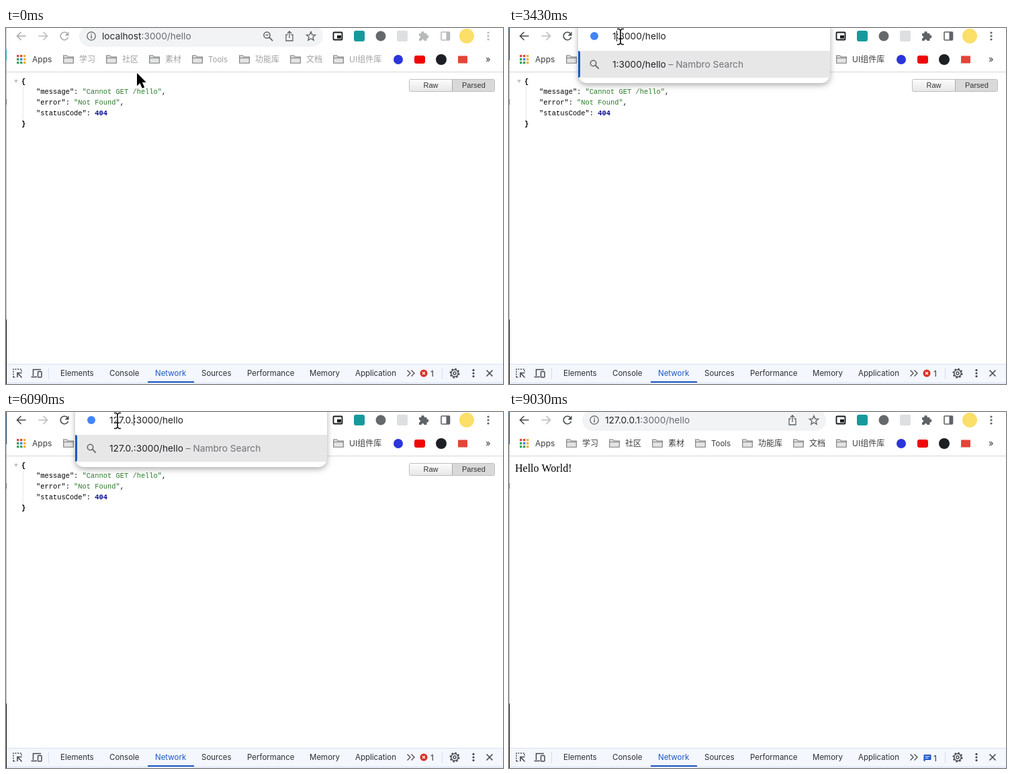
Write an HTML page with a canvas that moves like this. It is 740 px wide and 530 px high and loops after 9310 ms.

```html
<!DOCTYPE html>
<html lang="en">
<head>
<meta charset="utf-8">
<title>Local request</title>
<style>
html, body { margin: 0; width: 100%; height: 100%; overflow: hidden; background: #fff; }
canvas { display: block; width: 740px; height: 530px; }
</style>
</head>
<body>
<canvas id="stage"></canvas>
<script>
const W = 740, H = 530, LOOP = 9310, STEP = 70;
const canvas = document.getElementById('stage');
const dpr = window.devicePixelRatio || 1;
canvas.width = W * dpr;
canvas.height = H * dpr;
const c = canvas.getContext('2d');

const UI = 'Inter, "Noto Sans CJK SC", "Noto Sans CJK", sans-serif';
const MONO = '"Liberation Mono", monospace';
const INK = '#3c4043', LINK = '#1a57c4';
const TAU = Math.PI * 2;

const ACTIVE = 490, SELECT = 700, BLUR = 1680, PICK = 2590, ENTER = 7700, LOADED = 7840, REPORT = 8120;
const typed = [
  [3430, '1'], [3570, '12'], [4270, '127'], [5250, '127.'], [5880, '127.0'],
  [6020, '127.0.'], [6160, '127.0.0'], [6300, '127.0.0.'], [6860, '127.0.0.1']
];
const caretResets = [3430, 3640, 4270, 5250, 5530, 5880, 6020, 6160, 6300, 6580, 6860, 7070];
const path = [
  [0, 195, 67], [560, 190, 13], [700, 190, 13], [1260, 83, 10], [1680, 83, 10],
  [2380, 166, 13], [8400, 166, 13], [8960, 172, 545]
];
const clicks = [[630, 770], [1540, 1680], [2450, 2730]];

function text(s, x, y, size, color, font = UI, weight = 400) {
  c.font = `${weight} ${size}px ${font}`;
  c.fillStyle = color;
  c.fillText(s, x, y);
  return x + c.measureText(s).width;
}
function rect(x, y, w, h, color) {
  c.fillStyle = color;
  c.fillRect(x, y, w, h);
}
function round(x, y, w, h, r, fill, stroke, lw = 1) {
  c.beginPath();
  c.roundRect(x, y, w, h, r);
  paint(fill, stroke, lw);
}
function disc(x, y, r, fill, stroke, lw = 1) {
  c.beginPath();
  c.arc(x, y, r, 0, TAU);
  paint(fill, stroke, lw);
}
function paint(fill, stroke, lw) {
  if (fill) { c.fillStyle = fill; c.fill(); }
  if (stroke) { c.strokeStyle = stroke; c.lineWidth = lw; c.stroke(); }
}
// Each polyline is a flat list of x, y pairs.
function lines(color, lw, ...polys) {
  c.beginPath();
  for (const p of polys)
    for (let i = 0; i < p.length; i += 2) c[i ? 'lineTo' : 'moveTo'](p[i], p[i + 1]);
  paint(null, color, lw);
}
function dots(x, y, gap, color) {
  for (const k of [-1, 0, 1]) disc(x, y + k * gap, 1.6, color);
}
function lens(x, y, r, color) {
  disc(x - 1.5, y - 1.5, r, null, color, 1.5);
  lines(color, 1.8, [x + r * .7 - 1.5, y + r * .7 - 1.5, x + r + 2.5, y + r + 2.5]);
}
function latest(list, t) {
  return list.filter(e => (e[0] ?? e) <= t).pop();
}

function navButtons(on) {
  const ink = on ? '#46494d' : '#a9abad';
  const arrow = (x, d, color) =>
    lines(color, 1.6, [x - 6.5 * d, 12, x + 6.5 * d, 12], [x + .5 * d, 6, x + 6.5 * d, 12, x + .5 * d, 18]);
  arrow(23, -1, ink);
  arrow(55, 1, '#b9bbbe');
  c.beginPath();
  c.arc(87, 12, 5.8, .3, TAU - .8);
  paint(null, ink, 1.6);
  c.beginPath();
  c.moveTo(93.5, 5.5); c.lineTo(93.5, 11.5); c.lineTo(87.5, 11.5);
  paint(ink);
}

function barIcons(zoomed) {
  disc(127, 12, 6.2, null, '#5f6368', 1.3);
  rect(126.3, 11, 1.5, 4.5, '#5f6368');
  rect(126.3, 8.4, 1.5, 1.5, '#5f6368');
  if (zoomed) {
    lens(390, 12, 4.6, '#5f6368');
    lines('#5f6368', 1.3, [386.3, 10.5, 390.8, 10.5]);
  }
  lines('#5f6368', 1.3, [419.5, 10, 417, 10, 417, 19, 427, 19, 427, 10, 424.5, 10],
    [422, 15, 422, 5.5], [419, 8, 422, 5, 425, 8]);
  c.beginPath();
  for (let i = 0; i < 10; i++) {
    const a = i * Math.PI / 5 - Math.PI / 2, r = i % 2 ? 3.1 : 7;
    c.lineTo(454 + r * Math.cos(a), 12.6 + r * Math.sin(a));
  }
  c.closePath();
  paint(null, '#5f6368', 1.4);
}

function extensions(on) {
  const ink = on ? '#5f6368' : '#b7b9bb';
  round(487.5, 6.5, 13, 11, 1, '#fff', '#17191c', 1.8);
  rect(493, 11, 6, 4.5, '#17191c');
  round(518, 4, 16, 16, 3, '#159a9c');
  disc(558, 12, 7.5, '#66696b');
  round(582, 4, 16, 16, 2, '#dedfe0');
  rect(615, 8, 11.5, 11, ink);
  disc(620.5, 7.5, 2.4, ink);
  disc(627, 13, 2.4, ink);
  disc(615, 13.5, 2, '#fff');
  disc(620.5, 19, 2, '#fff');
  round(648, 6, 12.5, 12, 1, null, ink, 1.6);
  rect(655.5, 6, 5, 12, ink);
  disc(686, 12, 11, '#fbdf68');
  dots(718, 12, 5, ink);
}

function bookmarks(on) {
  const palette = ['#e04a3f', '#e04a3f', '#f2b52c', '#36a457', '#4a80e8', '#f2b52c', '#36a457', '#36a457', '#f2b52c'];
  palette.forEach((p, i) => rect(16 + i % 3 * 5, 40 + Math.floor(i / 3) * 5, 3.4, 3.4, p));
  text('Apps', 39, 51, 12, '#3c3c3c');
  const items = [[85, '学习'], [149, '社区'], [213, '素材'], [277, 'Tools'], [347, '功能库'], [423, '文档'], [487, 'UI组件库']];
  for (const [x, name] of items) {
    c.beginPath();
    c.moveTo(x + .7, 52.3); c.lineTo(x + .7, 41); c.lineTo(x + 5.5, 41);
    c.lineTo(x + 7.3, 43); c.lineTo(x + 15.3, 43); c.lineTo(x + 15.3, 52.3);
    c.closePath();
    paint('#e4e4e4', '#77797b', 1.1);
    lines('#77797b', 1, [x + .7, 44.7, x + 15.3, 44.7]);
    text(name, x + 24, 51, name === 'Tools' ? 11.5 : 12, on ? '#3c3c3c' : '#a0a0a0');
  }
  disc(584, 47, 7, '#2b35db');
  round(608, 41, 16, 12, 3, '#f00606');
  disc(648, 47, 8, '#1c1f23');
  round(673, 41.5, 14, 11, 1, '#e4453a');
  text('»', 714, 51, 13, '#3c3c3c');
}

function addressBar(t, entry) {
  if (entry) return;
  const focused = t >= SELECT && t < BLUR || t >= PICK && t < ENTER;
  if (focused) round(109, -4, 363, 32.5, 16, '#fff', '#2057b6', 2);
  else round(109, -4, 363, 32, 16, '#f1f3f4');
  barIcons(t < ENTER);
  const host = t < ENTER ? 'localhost' : '127.0.0.1', rest = ':3000/hello';
  if (focused) {
    c.font = `400 13.7px ${UI}`;
    const part = t < BLUR ? host + rest : host;
    rect(143, 3, c.measureText(part).width, 18, '#b2d3fb');
  }
  const end = text(host, 143, 17, 13.7, '#25282c');
  text(rest, end, 17, 13.7, focused ? '#25282c' : '#686c71');
}

function suggestions(t, entry) {
  if (!entry) return;
  c.save();
  c.shadowColor = 'rgba(0,0,0,.32)';
  c.shadowBlur = 9 * dpr;
  c.shadowOffsetY = 3 * dpr;
  round(103, -14, 375, 96, 13, '#fff');
  c.restore();
  rect(103, 34, 375, 40, '#e7e7e8');
  round(103, 34, 3, 40, [0, 3, 3, 0], LINK);
  disc(127, 12, 6, '#4285f4');
  lens(127, 54, 4.2, '#5f6368');
  const url = entry[1] + ':3000/hello';
  text(url, 154, 17, 13.7, '#202124');
  const end = text(url, 154, 59, 13.7, '#202124');
  text(' – Nambro Search', end, 59, 13.7, '#707377');
  if (Math.floor((t - latest(caretResets, t)) / 490) % 2 === 0) {
    c.font = `400 13.7px ${UI}`;
    rect(Math.round(154 + c.measureText(entry[1]).width), 4, 1, 16, '#111');
  }
}

function page(t) {
  if (t >= LOADED) {
    text('Hello World!', 9, 89, 16, '#000', '"Liberation Serif", serif');
    return;
  }
  const size = 10.4, green = '#2a7a2a';
  c.beginPath();
  c.moveTo(12, 77); c.lineTo(18, 77); c.lineTo(15, 82);
  paint('#c4c4c4');
  c.setLineDash([1, 1]);
  lines('#cfcfcf', 1, [25.5, 87, 25.5, 136]);
  c.setLineDash([]);
  text('{', 23, 83, size, '#000', MONO, 700);
  const rows = [['message', '"Cannot GET /hello"'], ['error', '"Not Found"'], ['statusCode', '404']];
  rows.forEach(([key, value], i) => {
    const y = 98.3 + i * 15.8, last = i === 2;
    let x = text(`"${key}": `, 45, y, size, '#000', MONO);
    x = text(value, x, y, size, last ? '#00008b' : green, MONO, last ? 700 : 400);
    if (!last) text(',', x, y, size, '#000', MONO);
  });
  text('}', 23, 146, size, '#000', MONO, 700);

  const g = c.createLinearGradient(0, 76, 0, 95);
  g.addColorStop(0, '#fdfdfd');
  g.addColorStop(1, '#e6e6e6');
  round(600.5, 76.5, 127, 18, 2, g, '#bdbdbd');
  rect(664, 77, 63, 17, '#d9d9d9');
  rect(664, 77, 1, 17, '#ababab');
  const sans = '"Liberation Sans", sans-serif';
  text('Raw', 621.5, 89, 11, '#333', sans);
  text('Parsed', 679, 89, 11, '#333', sans);
}

function devtools(t) {
  const ink = '#46494d';
  rect(0, 500, W, 30, '#f4f7fd');
  rect(0, 500, W, 1, '#d5e1f5');
  rect(0, 528, W, 1, '#d3dff3');
  rect(63, 506, 1, 17, '#d3dff3');
  rect(649, 506, 1, 17, '#d3dff3');

  c.setLineDash([2, 1.6]);
  lines(ink, 1.5, [11, 520, 11, 508, 23, 508, 23, 512], [11, 520, 15, 520]);
  c.setLineDash([]);
  lines(ink, 1.6, [17, 520, 17, 513.5, 23.5, 513.5], [17.5, 514, 23.5, 520.5]);
  lines(ink, 1.5, [52, 508.5, 40.5, 508.5, 40.5, 518], [37.5, 519.5, 46, 519.5]);
  round(47.5, 511.5, 5.5, 8.5, 1, '#f4f7fd', ink, 1.5);

  const tabs = [[81, 'Elements'], [154, 'Console'], [222, 'Network'], [291, 'Sources'],
    [359, 'Performance'], [452, 'Memory'], [520, 'Application']];
  for (const [x, name] of tabs) text(name, x, 518, 11.5, name === 'Network' ? LINK : '#2c2f33');
  rect(211, 526, 69, 2, LINK);
  lines(ink, 1.3, [597.5, 509.5, 602, 514, 597.5, 518.5], [603.5, 509.5, 608, 514, 603.5, 518.5]);

  if (t < REPORT) {
    disc(622, 514, 5.5, '#d92f25');
    lines('#fff', 1.3, [620, 512, 624, 516], [624, 512, 620, 516]);
    text('1', 632, 518.5, 12, '#2c2f33');
  } else {
    round(617.5, 510, 11, 8, 1, LINK);
    lines(LINK, 2, [618.5, 516, 618.5, 520]);
    lines('#fff', 1, [619.5, 512.7, 626.5, 512.7], [619.5, 515.2, 624.5, 515.2]);
    text('1', 632, 520, 12, '#2c2f33');
  }

  disc(668, 514, 5.2, null, ink, 1.5);
  disc(668, 514, 2, null, ink, 1.4);
  c.setLineDash([2.6, 2.6]);
  disc(668, 514, 6.6, null, ink, 1.8);
  c.setLineDash([]);
  dots(696, 514, 4.6, ink);
  lines(ink, 1.6, [715.5, 509.5, 724.5, 518.5], [724.5, 509.5, 715.5, 518.5]);
}

function edge(on) {
  rect(0, 0, 1, 48, on ? '#173b5c' : '#c9cdd0');
  if (!on) rect(0, 32, 1, 16, '#22a9b8');
  rect(0, 48, 1, 386, '#b9bbbd');
  rect(0, 106, 1, 8, '#6c6e70');
  rect(0, 434, 1, 96, '#111');
}

function pointerAt(t) {
  const i = path.findIndex(p => p[0] > t);
  if (i < 0) return path[path.length - 1].slice(1);
  const [t0, x0, y0] = path[i - 1], [t1, x1, y1] = path[i];
  const k = (1 - Math.cos(Math.PI * (t - t0) / (t1 - t0))) / 2;
  return [x0 + (x1 - x0) * k, y0 + (y1 - y0) * k];
}

function pointer(t) {
  const [x, y] = pointerAt(t);
  if (clicks.some(([a, b]) => t >= a && t < b)) disc(x - 2, y - 4.5, 26, null, '#111', 1.5);
  c.save();
  c.translate(x, y);
  c.lineJoin = 'round';
  if (x > 109 && x < 472 && y < 30) {
    const beam = [[-5, -11.5, -2, -11.5, 0, -9.5, 0, 9.5, -2, 11.5, -5, 11.5],
      [5, -11.5, 2, -11.5, 0, -9.5], [5, 11.5, 2, 11.5, 0, 9.5], [-3, 3, 3, 3]];
    lines('#fff', 3.6, ...beam);
    lines('#111', 1.7, ...beam);
  } else {
    c.scale(1.2, 1.2);
    const shape = [0, 0, 0, 16, 3.7, 12.6, 6.5, 19, 9.3, 17.8, 6.6, 11.6, 11.4, 11.4];
    c.beginPath();
    for (let i = 0; i < shape.length; i += 2) c.lineTo(shape[i], shape[i + 1]);
    c.closePath();
    paint(null, '#fff', 2);
    paint('#000');
  }
  c.restore();
}

function draw(t) {
  c.setTransform(dpr, 0, 0, dpr, 0, 0);
  const on = t >= ACTIVE;
  const entry = t < ENTER ? latest(typed, t) : null;
  rect(0, 0, W, H, '#fff');
  navButtons(on);
  addressBar(t, entry);
  extensions(on);
  bookmarks(on);
  rect(0, 65, W, 1, '#d4d5d7');
  page(t);
  suggestions(t, entry);
  devtools(t);
  edge(on);
  pointer(t);
}

const start = performance.now();
function tick() {
  const t = (performance.now() - start) % LOOP;
  draw(Math.floor(t / STEP) * STEP);
  requestAnimationFrame(tick);
}
tick();
</script>
</body>
</html>
```
